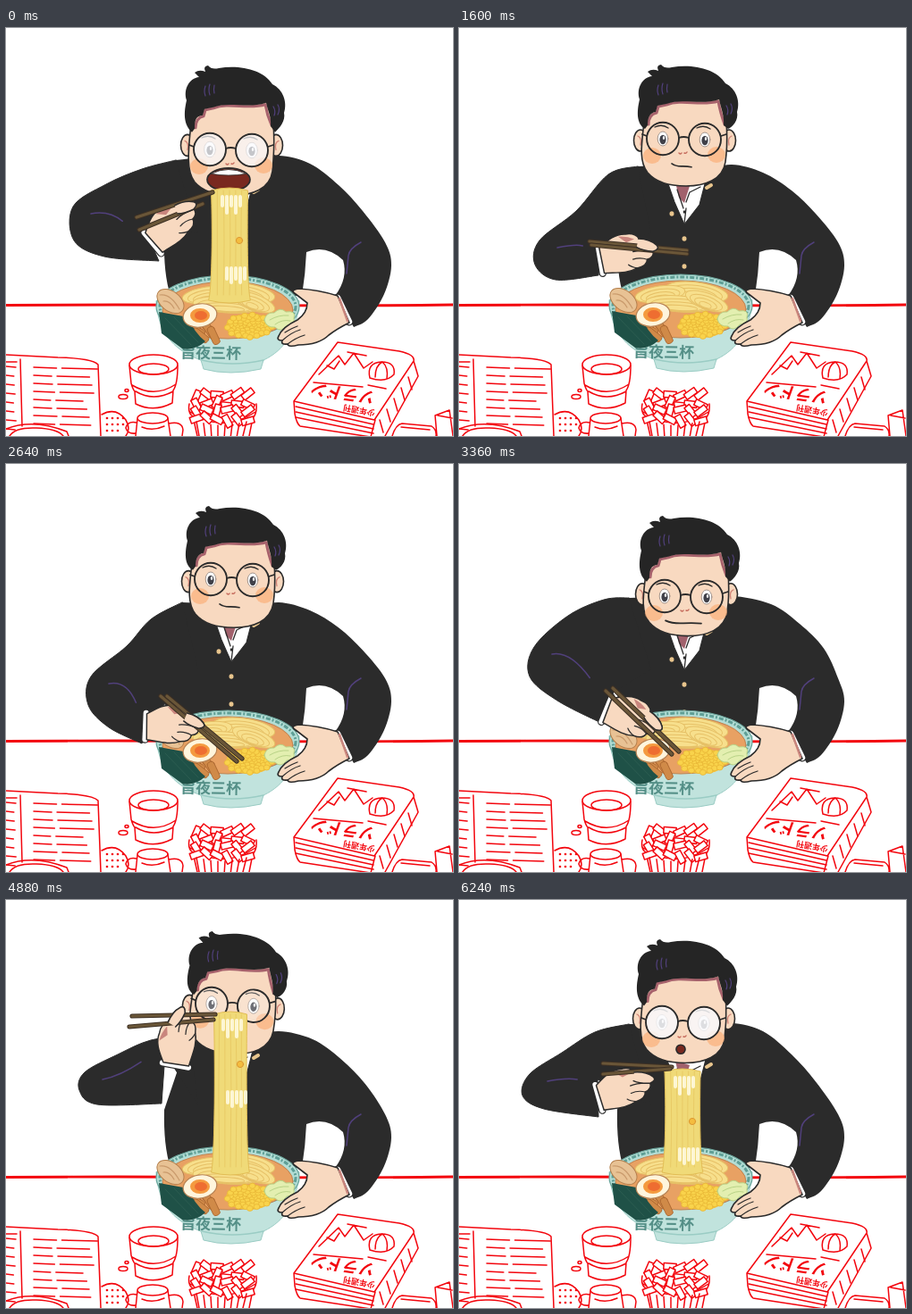
An HTML page for the animation above (6.32 s loop, 500 px wide and 457 px high).

```html
<!DOCTYPE html>
<html lang="ja">
<head>
<meta charset="utf-8">
<title>Ramen lunch</title>
<style>
  html, body { margin: 0; width: 100%; height: 100%; overflow: hidden; background: #fff; }
  svg { display: block; width: 100%; height: 100%; }
  text { font-family: "Noto Sans CJK JP", "Noto Sans CJK", sans-serif; font-weight: 700; }
</style>
</head>
<body>
<svg viewBox="0 0 500 457" stroke-linecap="round" stroke-linejoin="round">
  <g id="table" fill="none" stroke="#f3060e" stroke-width="1.5"></g>
  <g id="person"></g>
  <g id="bowl"></g>
  <g id="front"></g>
</svg>
<script>
const LOOP = 6320, STEP = 80;
const RED = '#f3060e', INK = '#2b2b2b', SKIN = '#f8d9c0', PURPLE = '#51407c', NOODLE = '#f0da78', STICK = '#6a5638';
const $ = id => document.getElementById(id);

const path = (d, fill = 'none', stroke = 'none', width = 1.6, extra = '') =>
  `<path d="${d}" fill="${fill}" stroke="${stroke}" stroke-width="${width}" ${extra}/>`;
const oval = (x, y, rx, ry, fill = 'none', stroke = 'none', width = 1.6, extra = '') =>
  `<ellipse cx="${x}" cy="${y}" rx="${rx}" ry="${ry}" fill="${fill}" stroke="${stroke}" stroke-width="${width}" ${extra}/>`;
const range = (n, f) => Array.from({ length: n }, (_, i) => f(i)).join('');
const noise = i => { const v = Math.sin(i * 91.7 + 3) * 437.58; return v - Math.floor(v); };

// Poses. head: x, y, downward look, tilt. arm: shoulder round the elbow to both cuff ends.
// sticks: two lines. hand: wrist x, y, angle. noodle: x, top, bottom, width.
// rise and lean move the shoulders, collar moves the shirt front.
const bite = {
  head: [0, 1, 11, 0], rise: -10, lean: 0, collar: 5, mouth: [24, 13], fog: .72, wide: 1, bowl: 1,
  arm: [190,148, 152,158, 112,175, 75,200, 76,238, 110,256, 171,261, 154,222],
  sticks: [146,212, 231,184, 149,226, 220,197], hand: [165, 239, -36], noodle: [250, 180, 305, 41]
};
const slurp = {
  head: [1, 1, -1, 0], rise: -10, lean: 0, collar: 0, mouth: [13, 5], fog: 0, wide: .2, bowl: 0,
  arm: [200,148, 157,156, 125,173, 84,200, 73,230, 96,250, 153,250, 151,216],
  sticks: [141,207, 234,219, 146,211, 253,232], hand: [154, 231, -6], noodle: [248, 153, 257, 35]
};
const chew = {
  head: [0, 0, 0, 0], rise: 0, lean: 0, collar: 0, mouth: [11, 0], fog: 0, wide: 0, bowl: 0,
  arm: [200,155, 167,164, 131,205, 90,238, 85,265, 108,282, 156,277, 159,244],
  sticks: [146,239, 255,249, 148,243, 255,253], hand: [160, 259, -6], noodle: [248, 150, 150, 24]
};
const dip = {
  head: [1, 6, -1, 0], rise: 2, lean: 0, collar: 2, mouth: [11, 0], fog: 0, wide: 0, bowl: 0,
  arm: [197,155, 162,174, 135,204, 95,238, 92,270, 115,295, 152,313, 167,280],
  sticks: [173,260, 258,333, 180,260, 264,330], hand: [158, 293, 6], noodle: [248, 300, 300, 24]
};
const pick = {
  head: [3, 20, 11, 0], rise: -5, lean: 9, collar: 11, mouth: [20, 0], fog: 0, wide: 0, bowl: 0,
  arm: [190,150, 162,152, 122,170, 84,205, 79,238, 110,265, 161,291, 173,255],
  sticks: [170,250, 238,322, 176,247, 253,312], hand: [167, 275, 26], noodle: [250, 303, 303, 34]
};
const lift = {
  head: [1, -5, -2, 2], rise: -6, lean: 3, collar: -2, mouth: [11, 0], fog: .25, wide: .6, bowl: 0,
  arm: [205,152, 162,157, 125,173, 88,193, 82,213, 102,229, 174,228, 178,172],
  sticks: [141,130, 234,128, 138,142, 232,134], hand: [189, 183, -76], noodle: [251, 126, 305, 37]
};
const blow = {
  head: [-1, 3, 10, 0], rise: -15, lean: 0, collar: 8, mouth: [5, 5], fog: .85, wide: .8, bowl: 0,
  arm: [190,139, 152,148, 115,171, 79,195, 71,219, 95,234, 156,243, 155,201],
  sticks: [161,183, 238,187, 161,195, 236,189], hand: [158, 220, -12], noodle: [250, 190, 305, 40]
};
const keys = [
  [0, bite],
  [320, { ...bite, head: [0, 2, 9, 0], mouth: [15, 8], fog: .4 }],
  [560, { ...slurp, head: [1, 1, 5, 0], fog: .15, noodle: [249, 166, 300, 38] }],
  [880, slurp],
  [1200, { ...slurp, head: [1, -12, -3, 0], rise: -6, noodle: [248, 142, 164, 26] }],
  [1360, { ...chew, head: [0, -8, -1, 0], mouth: [10, 2] }],
  [1600, chew],
  [2080, { ...chew, head: [0, 1, 0, 0] }],
  [2480, { ...dip, head: [1, 4, 0, 0] }],
  [2640, dip],
  [3040, { ...dip, head: [1, 7, 0, 0] }],
  [3360, { ...pick, head: [2, 17, 7, 0], sticks: [164,254, 238,325, 172,251, 246,322] }],
  [3760, { ...pick, head: [3, 19, 10, 0], hand: [168, 278, 24] }],
  [4160, pick],
  [4400, { ...pick, head: [2, 11, 7, 0], noodle: [250, 286, 305, 36] }],
  [4880, lift],
  [5120, { ...lift, head: [1, -6, -1, 1] }],
  [5440, { ...blow, head: [0, 0, 7, 0], fog: .2 }],
  [5840, { ...blow, fog: .6 }],
  [6240, blow],
  [LOOP, bite]
];

const mix = (a, b, k) => Array.isArray(a) ? a.map((v, i) => v + (b[i] - v) * k) : a + (b - a) * k;
function poseAt(t) {
  const next = keys.findIndex(key => key[0] > t);
  const [t0, a] = keys[next - 1], [t1, b] = keys[next];
  let k = (t - t0) / (t1 - t0);
  k = k * k * (3 - 2 * k);
  return Object.fromEntries(Object.keys(a).map(name => [name, mix(a[name], b[name], k)]));
}

// Smooth open curve through a flat list of coordinates.
function spline(flat, begin = 'M') {
  const pts = [];
  for (let i = 0; i < flat.length; i += 2) pts.push([flat[i], flat[i + 1]]);
  const at = i => pts[Math.max(0, Math.min(pts.length - 1, i))];
  let d = begin + pts[0];
  for (let i = 0; i < pts.length - 1; i++) {
    const [a, b, c, e] = [at(i - 1), at(i), at(i + 1), at(i + 2)];
    d += `C${b.map((v, j) => v + (c[j] - a[j]) / 6)} ${c.map((v, j) => v - (e[j] - b[j]) / 6)} ${c}`;
  }
  return d;
}

function drawTable() {
  const line = d => `<path d="${d}"/>`;
  const ring = (x, y, rx, ry) => oval(x, y, rx, ry, 'none', RED, 1.5);
  const menu = line('M0 366L58 369Q97 370 103 377L106 457M16 371L18 446M0 374H12')
    + range(8, i => line(`M31 ${380 + i * 9}l${18 + noise(i) * 10} 1m6 0l${30 + noise(i + 9) * 10} 1M0 ${379 + i * 10}l${8 + noise(i) * 4} 1`))
    + line('M0 449Q30 437 68 452L70 457M4 457Q10 447 34 448T64 457');
  const shaker = line('M107 433Q123 424 134 439Q140 449 134 457')
    + range(11, i => ring(113 + i % 4 * 6, 437 + Math.floor(i / 4) * 7, .6, .6));
  const glass = ring(165, 377, 27, 11) + ring(165, 382, 17, 6)
    + line('M138 378L140 398Q142 405 144 407L145 421Q165 431 186 420L187 406Q192 399 192 378M141 400Q166 415 190 399M145 407Q165 419 187 407')
    + ring(131, 413, 5, 2.5) + ring(135, 406, 2, 1.5);
  const pitcher = ring(164, 437, 17, 6)
    + line('M147 438L145 457M181 437L184 457M146 442Q136 440 134 448Q136 455 145 454M182 443Q197 440 198 450L197 457M152 447Q164 452 177 446');
  const cubes = range(24, i => {
    const x = 213 + i % 6 * 11.5, y = 409 + Math.floor(i / 6) * 9 + noise(i) * 5;
    return `<rect x="-7" y="-3.5" width="14" height="7" fill="#fff" transform="translate(${x} ${y}) rotate(${noise(i + 40) * 150 - 75})"/>`;
  });
  const tub = line('M205 421Q203 431 209 435L214 457M280 421Q281 432 276 437L272 457M206 430Q242 455 279 430') + cubes
    + range(8, i => line(`M${213 + i * 8} ${441 + 4 * Math.sin(i * .45)}l${3 - i} 16`));
  const magazine = line('M371 352L440 362Q458 366 456 373L412 439L322 418ZM322 418L323 432Q325 443 329 446L408 458L413 439M456 373L461 390L424 457')
    + range(3, i => line(`M324 ${424 + i * 6}L411 ${444 + i * 5}`))
    + range(5, i => line(`M${418 + i * 8} ${439 - i * 12}l4 14`))
    + line('M350 388L372 367L379 377L389 364L400 381L410 374M359 378L367 382L373 373M382 363L403 367M407 392Q403 375 420 374Q436 374 434 388Q425 398 407 392M413 391Q413 378 421 374Q428 380 426 393M344 397L399 402M405 400L425 404')
    + `<g fill="${RED}" stroke="none"><text x="-36" y="6" font-size="18" transform="translate(377 409) rotate(188) skewX(-12)">ソラドン</text>`
    + '<text x="-18" y="3" font-size="9" transform="translate(395 428) rotate(190)">少年週刊</text></g>';
  const edge = line('M432 457Q436 444 443 443L476 446Q482 450 481 457M442 447L474 450M482 457L480 434L496 428L500 457M483 434L499 437');
  $('table').innerHTML = path('M0 310.5Q120 309.5 250 310.5T500 310', 'none', RED, 2.8)
    + menu + shaker + glass + pitcher + tub + magazine + edge;
}

function drawBowl() {
  const strands = [[266, 296, 35, 11, 8], [225, 298, 28, 9, -8], [247, 309, 38, 9, 4], [277, 306, 25, 9, 20]];
  const tangles = strands.map(([x, y, rx, ry, a]) =>
    `<g transform="translate(${x} ${y}) rotate(${a})">${range(4, i => oval(0, i * 1.5, rx - i * 6, ry - i * 2, i ? 'none' : '#f7df8c', '#e6c066', 1))}</g>`).join('');
  const corn = range(58, i => {
    const a = i * 2.4, r = Math.sqrt(i / 58);
    return oval(272 + 26 * r * Math.cos(a), 333 + 13 * r * Math.sin(a), 3.5, 3, '#f9d34b', '#e9b636', .8);
  });
  const leaf = path('M289 326Q291 317 300 318Q307 311 313 317Q325 315 322 324Q324 331 314 332Q307 341 301 334Q291 335 289 326Z', '#e3efb0', '#b9d286', 1)
    + path('M295 326Q305 320 316 321M301 331Q309 325 318 327', 'none', '#b8d286', 1);
  const menma = range(6, i => `<rect x="-10" y="-4" width="21" height="8" rx="3" fill="#d08a48" stroke="#a9652f" stroke-width=".8" transform="translate(${207 + i * 5} ${331 + i % 3 * 6}) rotate(${20 + i * 9})"/>`);
  const pork = oval(184, 305, 17, 11, '#e8c294', '#b5814f', 1, 'transform="rotate(38 184 305)"')
    + path('M172 298Q184 296 194 314M176 305Q183 304 188 313', 'none', '#c99a6c', 1.2);
  const nori = path('M171 317L204 323Q210 340 223 350Q211 361 197 358L174 341Z', '#1f5147') + path('M178 324L207 354M188 323L215 351', 'none', '#2c5d51', 1);
  const egg = oval(217, 321, 19, 13, '#fff5dc', '#b98455', 1.2, 'transform="rotate(-10 217 321)"') + oval(217, 321, 11, 8, '#f49a3f') + oval(218, 321, 7, 5, '#ee6d31');
  $('bowl').innerHTML =
    path('M168 305C170 345 193 362 218 371L221 381Q250 389 285 381L288 371C312 360 326 337 328 305Z', '#c1e3dd', '#9accc4', 1)
    + path('M219 371Q253 379 288 371', 'none', '#9accc4', 1.4)
    + oval(248, 311, 80, 35, '#b3ddd5', '#6aa69d', 1.2)
    + oval(248, 311, 76, 32, 'none', '#5f9f96', 3, 'stroke-linecap="butt" stroke-dasharray="5 2 2 2"')
    + oval(248, 315, 73, 32, '#e8a163', '#c08350', 1)
    + tangles + menma
    + '<text x="195" y="369" font-size="17" fill="#548f87" transform="rotate(1 228 366)">旨夜三杯</text>'
    + pork + nori + egg + oval(272, 333, 26, 14, '#f4c23c') + corn + leaf;
}

function body(p) {
  const r = p.rise, n = p.lean, a = p.arm, [dx, dy, hx, hy] = [a[6], a[7], a[14], a[15]];
  const rightSide = [275,160 + r, 305,153 + r, 340 + n,162 + r, 372 + n,182 + r * .6, 399 + n,208 + r * .3, 424,240, 431,266, 423,298, 405,326, 389,335];
  const torso = `M${a[0]} ${a[1]}Q225 ${153 + r} 238 ${160 + r}` + spline(rightSide, 'L')
    + 'L368 300Q383 280 377 260Q358 242 336 251Q335 275 331 300L184 300Q176 275 177 235Z';
  const buttons = [[238, 208], [252, 236], [252, 267]].map(([x, y]) => oval(x, y, 2.5, 2.8, '#e8c58d')).join('');
  const collar = path('M233 172L241 195L252 220L269 198L276 171Z', '#fff', INK, 1.2)
    + path('M242 172L246 190L252 196L258 177Z', '#a1616c') + path('M254 195L258 184L270 178M252 219L254 202M244 181L251 202', 'none', INK, 1.3)
    + oval(252, 206, 1.3, 1.8, INK) + path('M277 179l5 -3', 'none', '#e8c58d', 4);
  return path(torso, INK) + path(spline(a.slice(0, 14)) + `L${hx} ${hy}L215 230Z`, INK, INK, 1)
    + path(`M${dx + 20} ${dy + 8}Q${dx + 40} ${dy + 4} ${dx + (hx - dx) * .7} ${dy + (hy - dy) * .65 + 2}`, 'none', PURPLE, 1.5)
    + path('M397 240Q384 247 383 255L381 275', 'none', PURPLE, 1.5)
    + `<g transform="translate(0 ${p.collar})">${collar}${buttons}</g>`;
}

function eye(x, y, p) {
  const s = 1 + p.wide * .1;
  return oval(x, y, 5.8 * s, 8 * s, '#fff', '#8d7f78', .8) + oval(x, y + 1, 3.6, 5.2, '#3f4049') + oval(x + 1, y - 1, 1.2, 2, '#fff')
    + path(`M${x - 9} ${y - 13}q8 -4 15 1`, 'none', INK, 1.3);
}

function head(p, t) {
  const [x, y, look, tilt] = p.head, [mw, mh] = p.mouth;
  const brow = look * .25, jaw = mh * .9 - look * .2, ear = 126 + look * .4;
  const chewing = t > 1300 && t < 4100 ? Math.sin(t / 90) : 0;
  const ears = [[203, 1], [302, -1]].map(([ex, s]) => oval(ex, ear, 7.5, 12, SKIN, INK)
    + path(`M${ex - 3 * s} ${ear - 5}q${5 * s} 2 ${3 * s} 10`, 'none', '#d18478', 1.3)).join('');
  const face = path(`M208 95C206 122 199 ${147 + jaw} 211 ${162 + jaw}C222 ${175 + jaw} 240 ${177 + jaw} 254 ${177 + jaw}C275 ${177 + jaw} 295 ${170 + jaw} 298 ${150 + jaw}C301 128 300 100 295 78L220 78Z`, SKIN, INK);
  const hair = `M208 ${113 + brow}C198 107 199 93 202 80C198 68 205 55 216 54L211 49Q216 45 223 48Q220 42 226 41Q230 46 238 44C262 40 288 46 298 62C310 68 315 82 311 94C313 103 306 111 301 ${113 + brow}`
    + `L296 109C297 98 293 ${90 + brow} 291 ${80 + brow}C270 ${87 + brow} 250 ${78 + brow} 232 ${85 + brow}L222 ${87 + brow}L220 ${94 + brow}C213 ${95 + brow} 211 101 211 ${109 + brow}Z`;
  const shade = path(`M212 ${108 + brow}Q212 ${97 + brow} 221 ${95 + brow}L223 ${88 + brow}L232 ${86 + brow}C250 ${79 + brow} 270 ${88 + brow} 290 ${82 + brow}Q292 ${94 + brow} 297 108`, 'none', '#a7626c', 3);
  const shine = path('M223 64q-2 6 0 11M228 62q-2 6 0 12M233 63q-1 5 0 9M299 87q3 5 1 10M304 85q3 5 0 11', 'none', PURPLE, 1.2);
  const my = 152 + mh * .45;
  const mouth = mh < 1.5
    ? path(`M${249 - mw} ${151 - chewing}q${mw * .4} ${4 + chewing} ${mw} 3t${mw} ${-chewing}`, 'none', INK, 1.7)
    : oval(249, my, mw, mh, '#79291f', INK, 1.7)
      + (mw > 10 ? path(`M${249 - mw * .82} ${my - mh * .5}Q249 ${my - mh * 1.25} ${249 + mw * .82} ${my - mh * .5}Q249 ${my - mh * .25} ${249 - mw * .82} ${my - mh * .5}Z`, '#fff', INK, .8) : '');
  const lens = [[228, 124], [275, 125]].map(([lx, ly]) => eye(lx, ly, p)
    + oval(lx, ly, 18, 18.3, `rgba(250,250,252,${p.fog})`, INK, 1.9)).join('');
  const blush = [[216, 143], [288, 142]].map(([bx, by]) => oval(bx, by, 10, 9, '#fbb27e', 'none', 0, 'opacity=".75"')).join('');
  const features = blush + path('M246 140q2 2 3 0M252 140q2 1 3 -1', 'none', '#c5695a', 1.4) + mouth + lens
    + path('M246 123q5 -2 11 0M210 121l-5 -2M293 121l6 -2', 'none', INK, 1.8);
  return `<g transform="translate(${x} ${y}) rotate(${tilt} 255 150)">${ears}${face}${shade}`
    + `<g transform="translate(0 ${look})">${features}</g>${path(hair, '#252525')}${shine}</g>`;
}

function noodles([x, top, bottom, w], t) {
  const len = bottom - top;
  if (len < 3) return '';
  const half = w / 2, rooted = bottom > 300, flare = rooted ? Math.min(3, len / 10) : 0;
  const side = s => `${x + s * (half - 1)} ${top + len * .5} ${x + s * half} ${bottom - 8} ${x + s * (half + flare)} ${bottom}`;
  const hem = rooted ? `Q${x} ${bottom + 6} ${x - half - flare} ${bottom}`
    : `l-5 -15l-4 12l-5 -9l-5 8l-4 -5L${x - half} ${bottom - 5}`;
  const shape = `M${x - half} ${top + 2}Q${x} ${top - 4} ${x + half} ${top + 2}C${side(1)}${hem}C${x - half} ${bottom - 8} ${x - half + 2} ${top + len * .5} ${x - half} ${top + 2}Z`;
  const strands = range(5, i => {
    const sx = x - half + w * (i + 1) / 6;
    return path(`M${sx} ${top + 2}Q${sx + 2 * Math.sin(t / 160 + i)} ${top + len / 2} ${sx} ${bottom - 6}`, 'none', '#e3c05a', .6);
  });
  const gleam = rooted && len > 70 ? range(5, i => path(`M${x - 8 + i * 5} ${top + 9}v${10 + i % 2 * 8}M${x - 3 + i * 5} ${top + 89}v${12 + i % 2 * 4}`, 'none', '#fdf6d4', 4)) : '';
  const drop = rooted && len > 70 ? oval(x + 11, top + 58, 3.6, 3.6, '#f4bd3f', '#dd9832', 1) : '';
  const splash = !rooted && len > 60 ? oval(x - 10, bottom - 5, 2.5, 3, '#dd6a2f') + oval(x + 1, bottom + 5, 3.8, 4, '#dd6a2f') : '';
  return path(shape, NOODLE, '#e2bd55', 1) + strands + gleam + drop + splash;
}

function cuff(x0, y0, x1, y1) {
  const d = `M${x0} ${y0}L${x1} ${y1}`;
  return path(d, 'none', INK, 9) + path(d, 'none', '#fff', 6.4);
}

function front(p, t) {
  const s = p.sticks, [hx, hy, angle] = p.hand;
  const stick = i => {
    const d = `M${s[i]} ${s[i + 1]}L${s[i + 2]} ${s[i + 3]}`;
    return path(d, 'none', '#3d3024', 5.2) + path(d, 'none', STICK, 3.2);
  };
  const place = art => `<g transform="translate(${hx} ${hy}) rotate(${angle}) scale(.93)">${art}</g>`;
  const fist = path('M-2 -14C8 -21 18 -29 31 -27Q42 -28 47 -20Q60 -18 67 -10Q71 -5 62 -3Q63 4 54 6Q53 14 41 15C28 21 12 17 1 17Z', SKIN, INK)
    + path('M62 -3Q48 -7 38 -5M54 6Q46 2 37 4M41 15Q34 13 31 10', 'none', INK, 1.3)
    + path('M22 -25Q32 -25 41 -20L31 -17Z', '#c9857d');
  const fingertip = path('M46 -20Q60 -18 67 -10Q71 -5 62 -3Q50 -5 43 -10', SKIN, INK);
  // The cuff crosses the wrist, square to the hand.
  const wrist = place(cuff(-3, -15, -1, 17));
  const rightHand = path('M371 300Q349 293 327 292Q317 294 324 298L337 308Q337 319 326 327Q309 335 305 345Q302 350 309 350Q307 355 315 354Q316 358 327 355Q350 355 361 344Q370 337 384 330Z', SKIN, INK)
    + path('M309 350Q319 341 329 338M315 354Q324 347 334 344M312 341Q320 336 326 334', 'none', INK, 1.3)
    + path('M373 303L382 328', 'none', '#c9857d', 2.5);
  return noodles(p.noodle, t) + wrist + place(fist) + stick(0) + stick(4) + place(fingertip)
    + cuff(371, 302, 384, 329) + rightHand;
}

function render(time) {
  const t = Math.floor(time % LOOP / STEP) * STEP, p = poseAt(t);
  $('person').innerHTML = body(p) + head(p, t);
  $('bowl').setAttribute('transform', `translate(0 ${p.bowl})`);
  $('front').innerHTML = front(p, t);
}

drawTable();
drawBowl();
const start = performance.now();
function tick() {
  render(performance.now() - start);
  requestAnimationFrame(tick);
}
tick();
</script>
</body>
</html>
```
